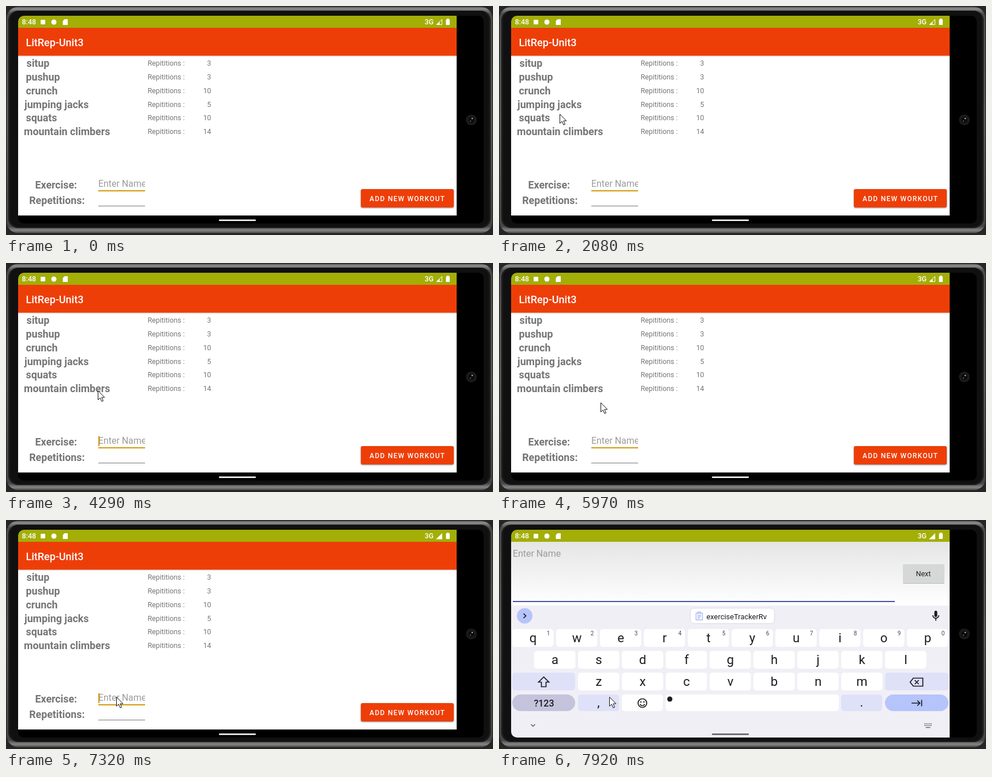
Write an HTML page that moves like this. It is 844 by 399 pixels and loops after 8 s.

```html
<!DOCTYPE html>
<html lang="en">
<head>
<meta charset="utf-8">
<title>Workout list</title>
<style>
html, body { margin: 0; width: 100%; height: 100%; overflow: hidden; background: #1b1b1b; }
svg { display: block; width: 844px; height: 399px; font-family: Roboto, sans-serif; }
text { white-space: pre; }
.bold { font-weight: 700; font-size: 17.8px; fill: #757575; }
.small { font-size: 12.3px; fill: #757575; }
.status { font-weight: 500; font-size: 12.5px; fill: #fff; }
.hint { font-size: 15.9px; fill: #9b9b9b; }
.mid { text-anchor: middle; }
.end { text-anchor: end; }
.letter { font-size: 22px; fill: #1b1b21; }
.digit { font-size: 10px; fill: #45464f; }
.line { fill: none; stroke: #1b1b21; stroke-width: 1.7; }

.caret, .weak, .strong, .editor, .editCaret, .tools { animation: 8s step-end infinite; }
.caret { animation-name: blink; }
.weak { animation-name: weak; }
.strong { animation-name: strong; }
.editor { animation-name: editor; }
.editCaret { animation-name: editCaret; }
.tools { animation-name: tools; }
.pointer { animation: move 8s linear infinite, enter 8s step-end infinite; }

@keyframes blink {
  0%, 10%, 23.25%, 35.125%, 47.875%, 60.5%, 72.875%, 84.75% { opacity: 0; }
  5%, 16.75%, 29.375%, 41.25%, 53.625%, 66.25%, 78.875%, 90%, 100% { opacity: 1; }
}
@keyframes weak { 0% { opacity: 1; } 87.375%, 100% { opacity: 0; } }
@keyframes strong { 0% { opacity: 0; } 87.375%, 100% { opacity: 1; } }
@keyframes editor { 0% { opacity: 0; } 95.625%, 100% { opacity: 1; } }
@keyframes editCaret { 0% { opacity: 1; } 99%, 100% { opacity: 0; } }
@keyframes tools { 0% { opacity: 0; } 98.125%, 100% { opacity: 1; } }
@keyframes enter { 0% { opacity: 0; } 12.5%, 100% { opacity: 1; } }
@keyframes move {
  0%, 12.5% { transform: translate(694px, 385px); animation-timing-function: steps(2); }
  14.25% { transform: translate(241px, 253px); animation-timing-function: steps(3); }
  16.8125% { transform: translate(170px, 222px); animation-timing-function: steps(4); }
  20.25%, 21.9375% { transform: translate(156px, 215px); animation-timing-function: steps(5); }
  26%, 31.075% { transform: translate(105px, 188px); animation-timing-function: steps(6); }
  35.875%, 72% { transform: translate(159px, 222px); animation-timing-function: steps(3); }
  74.625% { transform: translate(176px, 243px); animation-timing-function: steps(3); }
  77.1875% { transform: translate(194px, 285px); animation-timing-function: steps(3); }
  79.75%, 100% { transform: translate(191px, 308px); }
}
</style>
</head>
<body>
<svg viewBox="0 0 844 399">
  <defs>
    <clipPath id="display"><rect x="21" y="17" width="807" height="362" rx="10"/></clipPath>
    <clipPath id="field"><rect x="160" y="298" width="81" height="24"/></clipPath>
    <linearGradient id="fade" x2="0" y2="1">
      <stop stop-color="#e5e5e5"/><stop offset="1" stop-color="#fff"/>
    </linearGradient>
    <linearGradient id="rim" x2="0" y2="1">
      <stop stop-color="#5c5c5c"/><stop offset=".008" stop-color="#8c8c8c"/>
      <stop offset=".03" stop-color="#4a4a4a"/><stop offset=".5" stop-color="#585858"/>
      <stop offset=".97" stop-color="#444"/><stop offset=".988" stop-color="#858585"/>
      <stop offset="1" stop-color="#505050"/>
    </linearGradient>
    <filter id="soft"><feGaussianBlur stdDeviation="1.2"/></filter>
  </defs>

  <!-- phone body -->
  <rect width="844" height="399" fill="#262626"/>
  <rect x="1" y="1.500" width="842" height="394" rx="20" fill="url(#rim)"/>
  <rect x="4" y="8" width="836" height="379" rx="17" fill="#1c1c1c"/>
  <rect x="7" y="9" width="830" height="376" rx="15" fill="#101010"/>
  <rect x="21" y="17" width="807" height="362" rx="10"/>
  <circle cx="806.500" cy="198.500" r="9.500" fill="#1a1a1a"/>
  <circle cx="806.500" cy="198.500" r="5" fill="#0b0b0b"/>
  <circle cx="808" cy="196" r="1.300" fill="#aaa"/>
  <circle cx="805" cy="200.500" r="1" fill="#777"/>

  <g clip-path="url(#display)">
    <rect x="21" y="87" width="760" height="278" fill="#fff"/>
    <rect x="21" y="38" width="760" height="49" fill="#ee3e08"/>
    <rect x="21" y="86.500" width="760" height="1" fill="#e9b9aa"/>
    <text x="34.500" y="70" font-size="18" font-weight="500" fill="#fff">LitRep-Unit3</text>
    <g id="list"></g>

    <text class="bold" x="50.500" y="318">Exercise:</text>
    <text class="bold" x="40.200" y="345">Repetitions:</text>
    <text class="hint" x="160" y="315" clip-path="url(#field)">Enter Name</text>
    <rect x="160" y="321" width="81" height="2" fill="#d39b0b"/>
    <rect x="160" y="348" width="81" height="1" fill="#777"/>
    <rect class="caret" x="160" y="302" width="2" height="17" fill="#d39b0b"/>

    <rect x="615" y="320" width="161" height="32" rx="3" fill="#888" filter="url(#soft)"/>
    <rect x="615" y="319" width="161" height="32" rx="3" fill="#ee3e08"/>
    <text x="630" y="339.500" font-size="12" font-weight="500" letter-spacing="1.25" fill="#fff">ADD NEW WORKOUT</text>
    <rect x="369" y="372" width="64" height="2.500" rx="1" fill="#fff"/>

    <!-- full screen editor with keyboard -->
    <g class="editor">
      <rect x="21" y="38" width="760" height="111" fill="url(#fade)"/>
      <text class="hint" x="24" y="64">Enter Name</text>
      <rect class="editCaret" x="24" y="47" width="2" height="22" fill="#4355a5"/>
      <rect x="24" y="141" width="662" height="2" fill="#4355a5"/>
      <rect x="700" y="78" width="72" height="33" rx="2" fill="#bcbcbc"/>
      <rect x="700" y="77" width="72" height="33" rx="2" fill="#d6d7d7"/>
      <text class="mid" x="735.500" y="98" font-size="12.500" fill="#222">Next</text>

      <rect x="21" y="149" width="760" height="230" fill="#f1eff6"/>
      <circle cx="44.500" cy="167" r="13.500" fill="#b6c4fc"/>
      <path class="line" d="M42.500 163l4 4-4 4"/>
      <rect x="331.500" y="153.500" width="146" height="27" rx="7" fill="#fff" stroke="#d9d8e0"/>
      <path d="M341.500 162.500h11v11.500h-11zM344.500 162.500v-2h5v2M344 166h6M344 168.500h6M344 171h4" fill="none" stroke="#a9b9f3" stroke-width="1.400"/>
      <text x="359.500" y="172.500" font-size="12.900" fill="#1b1b21">exerciseTrackerRv</text>
      <rect x="754.500" y="158" width="5" height="11" rx="2.500" fill="#1b1b21"/>
      <path class="line" d="M751.800 166a5.200 5.200 0 0 0 10.400 0M757 171.500v4"/>

      <g id="keys"></g>
      <path class="line" d="M77.500 273.500l-9 9h5v8h8v-8h5z"/>
      <path class="line" d="M718 275.500h16.500v14h-16.500l-5.500-7zM720.500 279l7 7M727.500 279l-7 7"/>
      <circle class="line" cx="248.500" cy="319" r="7.500"/>
      <circle cx="245.800" cy="317" r="1.200" fill="#1b1b21"/>
      <circle cx="251.200" cy="317" r="1.200" fill="#1b1b21"/>
      <path class="line" d="M244.500 320.800a4.300 4.300 0 0 0 8 0"/>
      <path class="line" d="M715 319h14M725 314.500l4.500 4.500-4.500 4.500M732.500 313.500v11"/>
      <circle cx="296" cy="312" r="4.500" fill="#1b1b21"/>

      <rect x="369" y="372" width="64" height="2.500" rx="1" fill="#fff"/>
      <g class="tools">
        <path d="M55.500 356l3.500 3.500 3.500-3.500" fill="none" stroke="#55555c" stroke-width="1.300"/>
        <path d="M737 355h13M737 358h13" stroke="#66666c" stroke-width="1.500" stroke-dasharray="1.500 .8"/>
        <path d="M739.500 361.500h8" stroke="#66666c" stroke-width="1.500"/>
        <rect x="369" y="372" width="64" height="2.500" rx="1" fill="#5b5a60"/>
      </g>
    </g>

    <!-- status bar -->
    <rect x="21" y="17" width="760" height="21" fill="#a3ae07"/>
    <text class="status" x="27.500" y="32">8:48</text>
    <rect x="60" y="24" width="8" height="8" rx="1" fill="#fff"/>
    <circle cx="83" cy="28" r="4.500" fill="#fff"/>
    <path d="M101.500 23h5.500v10h-8.500v-7z" fill="#fff"/>
    <text class="status" x="725.500" y="32">3G</text>
    <g class="weak">
      <path d="M755.500 23.500v9h-9.500z" fill="none" stroke="#fff"/>
      <path d="M751.500 27.500v5h-5.500z" fill="#fff"/>
    </g>
    <path class="strong" d="M756 23v10.500h-11z" fill="#fff"/>
    <path d="M764 22h3.500v1.500h1.500v9.500h-6.500v-9.500h1.500z" fill="#fff"/>
  </g>

  <path class="pointer" d="M.5.500v16l3.700-3.500 2.700 6.200 2.600-1.100-2.700-6h5z" fill="#fff" stroke="#111"/>
</svg>

<script>
const NS = "http://www.w3.org/2000/svg";

function add(parent, tag, attrs, content = "") {
  const node = document.createElementNS(NS, tag);
  for (const name in attrs) node.setAttribute(name, attrs[name]);
  node.textContent = content;
  parent.append(node);
}

const list = document.getElementById("list");
const workouts = [
  ["situp", 35.5, 3], ["pushup", 34.5, 3], ["crunch", 34.5, 10],
  ["jumping jacks", 32, 5], ["squats", 34.5, 10], ["mountain climbers", 31, 14]
];
workouts.forEach(([name, x, count], i) => {
  const y = Math.round(106 + i * 23.85);
  add(list, "text", { class: "bold", x, y }, name);
  add(list, "text", { class: "small", x: 245.5, y: y - 2 }, "Repititions :");
  add(list, "text", { class: "small end", x: 355.5, y: y - 2 }, count);
});

const keys = document.getElementById("keys");
const pitch = 76;

function key(x, y, width, fill = "#fff", rx = 5, height = 31) {
  add(keys, "rect", { x, y, width, height, rx, fill });
}

[["qwertyuiop", 23, 190], ["asdfghjkl", 61, 228], ["zxcvbnm", 137, 266]].forEach(([row, left, y], r) => {
  [...row].forEach((letter, i) => {
    const x = left + i * pitch;
    key(x, y, 71.5);
    add(keys, "text", { class: "letter mid", x: x + 36, y: y + 23 }, letter);
    if (r === 0) add(keys, "text", { class: "digit mid", x: x + 62.5, y: y + 11 }, (i + 1) % 10);
  });
});

const pale = "#dfe1f9", blue = "#b6c4fc";
key(23, 266, 109, pale);
key(669, 266, 110, pale);
key(23, 304, 109, "#c3c4dc", 14.5, 29);
key(137, 304, 71, pale, 5, 29);
key(213, 304, 71, "#fff", 5, 29);
key(289, 304, 300, "#fff", 5, 29);
key(593, 304, 71, pale, 5, 29);
key(669, 304, 110, blue, 14.5, 29);
add(keys, "text", { class: "mid", x: 78, y: 325, "font-size": 16, "font-weight": 500, fill: "#1b1b21" }, "?123");
add(keys, "text", { class: "letter mid", x: 172.5, y: 325 }, ",");
add(keys, "text", { class: "letter mid", x: 628.5, y: 325 }, ".");
</script>
</body>
</html>
```
